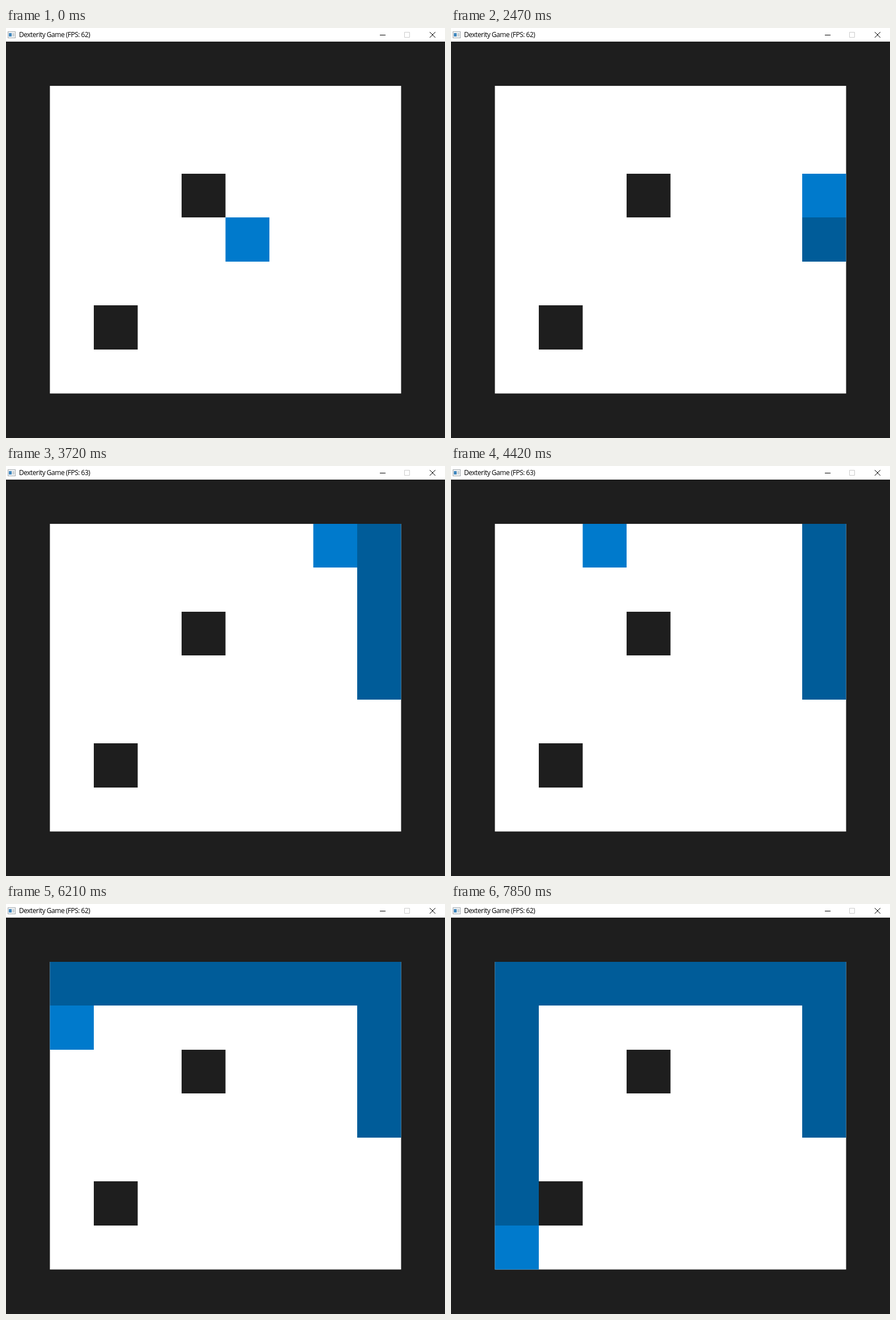
An HTML page for the animation above (8 s loop, 775 px wide and 723 px high).

```html
<!DOCTYPE html>
<html lang="en">
<head>
<meta charset="utf-8">
<title>Dexterity Game</title>
<style>
  html, body { margin: 0; width: 100%; height: 100%; overflow: hidden; background: #1e1e1e; }
  svg { display: block; }
  text { font: 12px "Open Sans", "Noto Sans", sans-serif; letter-spacing: -.5px; }
</style>
</head>
<body>
<svg width="775" height="723" viewBox="0 0 775 723">
  <rect width="775" height="723" fill="#1e1e1e"/>
  <rect width="775" height="24" fill="#fff"/>
  <g id="icon">
    <rect x="3.5" y="6.5" width="13" height="11" fill="#f4f6f7" stroke="#a3a9ad"/>
    <rect x="5" y="9" width="5" height="6" fill="#3f86bd"/>
    <rect x="11" y="9" width="4" height="6" fill="#cdd3d6"/>
  </g>
  <text x="23" y="16" id="title"></text>
  <g fill="none" stroke="#000">
    <path d="M660 12.5h10"/>
    <path d="M703.5 7.5h9v9h-9z" stroke="#ccc"/>
    <path d="M748 7l10 10M758 7l-10 10"/>
  </g>
  <g id="board"></g>
</svg>
<script>
const LOOP = 8000, CELL = 77.5;
const board = document.getElementById('board');
const title = document.getElementById('title');

const left = col => col * CELL;
const top_ = row => row === 8 ? 644.5 : Math.floor(24.5 + row * CELL);

function place(rect, col, row, cols = 1, rows = 1) {
  rect.setAttribute('x', left(col));
  rect.setAttribute('y', top_(row));
  rect.setAttribute('width', cols * CELL);
  rect.setAttribute('height', top_(row + rows) - top_(row));
}

function addRect(fill, ...area) {
  const rect = document.createElementNS('http://www.w3.org/2000/svg', 'rect');
  rect.setAttribute('fill', fill);
  place(rect, ...area);
  return board.appendChild(rect);
}

addRect('#fff', 1, 1, 8, 7);
addRect('#1e1e1e', 4, 3);
addRect('#1e1e1e', 2, 6);

// Painted areas: start time, column, row, columns, rows
const trail = [
  [2470, 8, 4, 1, 1], [3170, 8, 2, 1, 2], [3720, 8, 1, 1, 1],
  [5660, 2, 1, 6, 1], [6210, 1, 1, 1, 1], [7850, 1, 2, 1, 5]
].map(([start, ...area]) => ({ start, rect: addRect('#005c99', ...area) }));

const player = addRect('#007acc', 5, 4);

// Each run moves the player one cell per listed time
const runs = [
  { dx: 1, dy: 0, times: [1300, 1460, 1610] },
  { dx: 0, dy: -1, times: [2470, 2620, 2780] },
  { dx: -1, dy: 0, times: [3720, 3870, 4030, 4190, 4420, 4730, 5270] },
  { dx: 0, dy: 1, times: [6210, 6360, 6520, 6760, 7150, 7460] }
];
const fpsChanges = [[0, 62], [2780, 63], [4810, 64], [5820, 62]];

function draw(now) {
  const t = now % LOOP;
  let col = 5, row = 4;
  for (const { dx, dy, times } of runs) {
    const steps = times.filter(start => start <= t).length;
    col += dx * steps;
    row += dy * steps;
  }
  place(player, col, row);
  for (const { start, rect } of trail) {
    rect.setAttribute('visibility', t >= start ? 'visible' : 'hidden');
  }
  const fps = fpsChanges.filter(([start]) => start <= t).pop()[1];
  title.textContent = `Dexterity Game (FPS: ${fps})`;
}

const origin = performance.now();
function frame() {
  draw(performance.now() - origin);
  requestAnimationFrame(frame);
}
frame();
</script>
</body>
</html>
```
